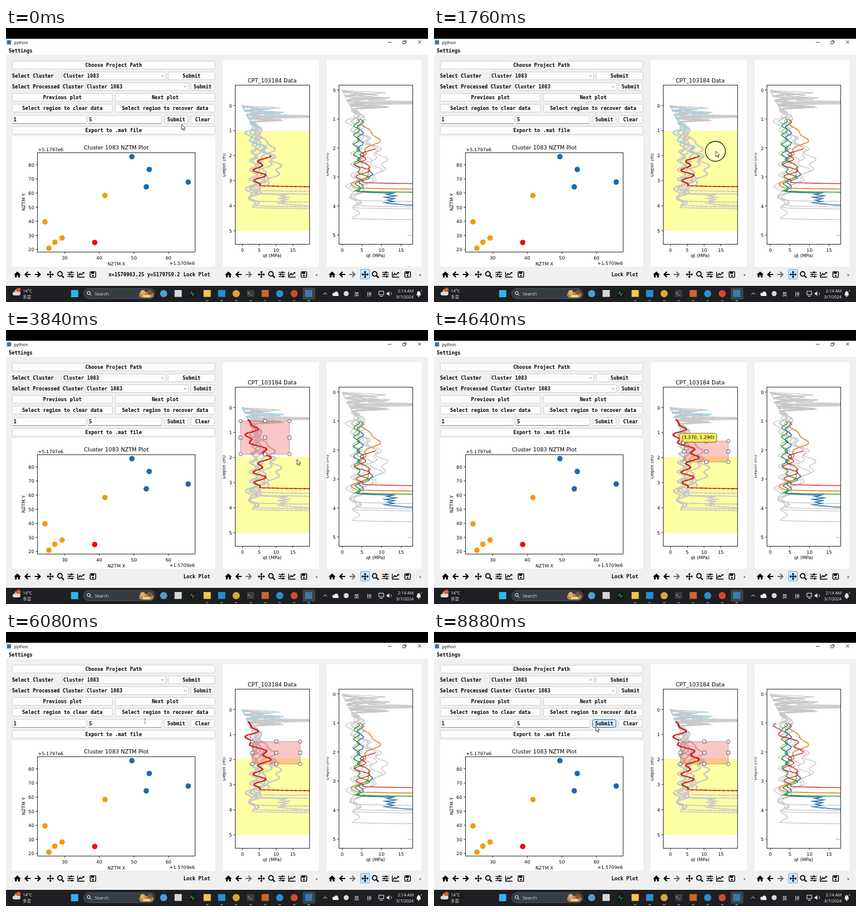
An HTML page with a canvas for the animation above (8960 ms loop, 704 px wide and 458 px high).

```html
<!DOCTYPE html>
<html lang="en">
<head>
<meta charset="utf-8">
<title>Cluster plot tool</title>
<style>
html, body { margin: 0; width: 704px; height: 458px; overflow: hidden; background: #000; }
canvas { display: block; }
</style>
</head>
<body>
<canvas id="stage" width="704" height="458"></canvas>
<script>
const LOOP = 8960, STEP = 80;
const main = document.getElementById('stage').getContext('2d');
let c = main;

const MONO = 'bold 8.25px "DejaVu Sans Mono", monospace';
const TICK = '7.6px "DejaVu Sans", sans-serif';
const HEAD = '9.15px "DejaVu Sans", sans-serif';
const UI = '7px "Open Sans", sans-serif';
const CJK = '8px "Noto Sans CJK TC", "Noto Sans CJK", "Noto Sans CJK SC", sans-serif';

// ---------- drawing helpers ----------
function text(s, x, y, font, color = '#000', align = 'left') {
  c.font = font; c.fillStyle = color; c.textAlign = align;
  c.fillText(s, x, y);
}
function rect(x, y, w, h, color) { c.fillStyle = color; c.fillRect(x, y, w, h); }
function paint(fill, stroke, lw) {
  if (fill) { c.fillStyle = fill; c.fill(); }
  if (stroke) { c.strokeStyle = stroke; c.lineWidth = lw; c.stroke(); }
}
function box(x, y, w, h, r, fill, stroke, lw = 1) {
  c.beginPath(); c.roundRect(x, y, w, h, r); paint(fill, stroke, lw);
}
function disc(x, y, r, fill, stroke, lw = 1) {
  c.beginPath(); c.arc(x, y, r, 0, 7); paint(fill, stroke, lw);
}
function trace(p) {
  c.beginPath();
  for (let i = 0; i < p.length; i += 2) c.lineTo(p[i], p[i + 1]);
}
function line(p, color, lw = 1) { trace(p); paint(null, color, lw); }
function poly(p, fill, stroke, lw) { trace(p); c.closePath(); paint(fill, stroke, lw); }
function upright(s, x, y, font) {
  c.save(); c.translate(x, y); c.rotate(-Math.PI / 2);
  text(s, 0, 0, font, '#000', 'center');
  c.restore();
}
function clipTo(x, y, w, h, draw) {
  c.save(); c.beginPath(); c.rect(x, y, w, h); c.clip(); draw(); c.restore();
}
function rng(seed) {
  return (a, b) => {
    seed = (seed * 16807) % 2147483647;
    return a + (b - a) * seed / 2147483647;
  };
}
const smooth = u => { u = Math.min(1, Math.max(0, u)); return u * u * (3 - 2 * u); };

// ---------- soundings, in the units of the right-hand plot ----------
// Each runs down from the surface with spikes near the top, then wiggles about
// a base with a few lumps [depth, size, spread] and leaves to the right.
function sounding(seed, { base, lumps, wig, period = 18, peak = 201, exit, teeth = 0, spikes }) {
  const r = rng(seed * 104729), out = [];
  r(0, 1);
  spikes = spikes || Array.from({ length: 4 }, (_, i) =>
    [110 + i * 7.5 + r(-2, 2), i === 2 && seed % 2 ? 150 : r(15, 75), r(2, 4.5)]);
  for (let y = 104; y < exit; y += 0.9) {
    let top = 561 + (y - 104) * 0.5;
    for (const [at, h, w] of spikes) top += h * Math.max(0, 1 - Math.abs(y - at) / w);
    let body = base + wig * Math.cos(2 * Math.PI * (y - peak) / period);
    for (const [at, h, w] of lumps) body += h * Math.exp(-(((y - at) / w) ** 2));
    const mix = smooth((y - 128) / 22);
    out.push([top + (body - top) * mix + r(-0.8, 0.8) * smooth((y - 104) / 10), y]);
  }
  const run = (x1, y1) => {
    const [x0, y0] = out[out.length - 1], n = Math.ceil(Math.abs(x1 - x0) / 9);
    for (let i = 1; i <= n; i++) out.push([x0 + (x1 - x0) * i / n, y0 + (y1 - y0) * Math.sqrt(i / n)]);
  };
  for (let i = 0; i < teeth; i++) run(i % 2 ? r(631, 637) : r(646, 656), exit + 2 + i * 2.3);
  run(700, out[out.length - 1][1] + 2.5);
  return out;
}
const red = sounding(1, { base: 588, wig: 8, period: 18.5, exit: 258, spikes: [[117, 80, 4]],
  lumps: [[162, -19, 12], [196, 22, 18], [240, 11, 8]] });
const orange = sounding(2, { base: 595, wig: 4, period: 20, peak: 190, exit: 267,
  lumps: [[186, 27, 14], [239, 14, 10], [262, -16, 9]] });
const green = sounding(3, { base: 585, wig: 5, period: 16, peak: 187, exit: 273, lumps: [[249, 17, 8]] });
const blue = sounding(4, { base: 591, wig: 5, peak: 193, exit: 274, lumps: [[240, 20, 11]], teeth: 9 });
const right = [[225, 42, 30], [286, -14, 12]];
const greys = [
  sounding(5, { base: 591, wig: 6, exit: 301, lumps: right }),
  sounding(7, { base: 590, wig: 6, exit: 297, lumps: [[206, 32, 20], [268, -18, 18]] }),
  sounding(8, { base: 582, wig: 7, exit: 288, lumps: [[180, 8, 12]] })
];
const deep = sounding(6, { base: 584, wig: 6, exit: 319, lumps: [[240, 38, 25]] });

const toMid = ([x, y]) => [394.5 + (x - 561) * 0.855, 129.5 + (y - 103.5) * 0.866];
const part = (pts, from, to) => pts.filter(q => q[1] >= from && q[1] <= to);
function curve(pts, color, from = 0, to = 999) { line(part(pts, from, to).flat(), color, 1.35); }
function beaded(pts, color, from = 0, to = 999) {
  const p = part(pts, from, to).map(toMid);
  line(p.flat(), color, 1.4);
  for (const [x, y] of p) disc(x, y, 1.2, color);
}

// ---------- plots ----------
const ticks = (n, v0, dv, p0, dp) => Array.from({ length: n }, (_, i) => [v0 + i * dv, p0 + i * dp]);
function axes(x, y, w, h, xt, yt) {
  c.strokeStyle = '#000'; c.lineWidth = 0.8;
  c.strokeRect(x + 0.5, y + 0.5, w, h);
  for (const [v, px] of xt) {
    line([px, y + h + 0.5, px, y + h + 3.5], '#000', 0.8);
    text(v, px, y + h + 12.5, TICK, '#000', 'center');
  }
  for (const [v, py] of yt) {
    line([x - 2.5, py, x + 0.5, py], '#000', 0.8);
    text(v, x - 5, py + 3, TICK, '#000', 'right');
  }
}
function scatter() {
  rect(10, 181, 339, 218, '#fff');
  const dots = (color, ...p) => { for (const [x, y] of p) disc(x, y, 4.5, color); };
  dots('#1b6aae', [210, 215], [239, 236.5], [234, 265.5], [304, 257.5]);
  dots('#f6990f', [165, 280], [65, 324], [93.5, 351], [81.5, 358], [71.5, 368]);
  dots('#ee0a0a', [148, 358.5]);
  axes(52, 208, 263, 166, ticks(4, 30, 10, 98, 57.7), ticks(7, 20, 10, 370.3, -23.6));
  text('Cluster 1083 NZTM Plot', 184, 202.5, HEAD, '#000', 'center');
  text('+5.1797e6', 53.5, 206, TICK);
  text('+1.5709e6', 315, 396, TICK, '#000', 'right');
  text('NZTM X', 184, 397, TICK, '#000', 'center');
  upright('NZTM Y', 31.5, 291, TICK);
}
function depthPlot(x, w, labelX, labelY) {
  text('qt (MPa)', x + w / 2, 383, TICK, '#000', 'center');
  upright('Depth (m)', labelX, labelY, TICK);
}
function midPlot(recovered) {
  clipTo(362, 54, 160, 345, () => {
    rect(362, 54, 160, 345, '#fff');
    depthPlot(382, 124, 366, 229);
  });
  const y0 = recovered ? 212 : 172, split = recovered ? 127 : 201;
  rect(382.5, y0, 124, 339 - y0, '#fefea3');
  clipTo(382, 96, 124.5, 265, () => {
    for (const g of [...greys, orange, green, blue]) beaded(g, '#c8c8c8');
    beaded(red, '#9fd3ea', 0, split);
    beaded(red, '#cf1d1f', split);
  });
  axes(382, 95, 124, 266, ticks(4, 0, 5, 394.5, 28), ticks(6, 0, 1, 129.5, 41.9));
  text('CPT_103184 Data', 444, 91, HEAD, '#000', 'center');
}
function rightPlot(submitted) {
  clipTo(535, 54, 158, 345, () => {
    rect(535, 54, 158, 345, '#fff');
    depthPlot(555, 123, 538, 228);
  });
  clipTo(555, 96, 123.5, 265, () => {
    for (const g of [...greys, deep, orange, green, blue]) curve(g, '#c8c8c8');
    const start = submitted ? 152 : 201;
    curve(red, '#c8c8c8', 0, start);
    line([670, 346.5, 680, 347], '#c8c8c8', 1.3);
    curve(blue, '#1f6fb0', 152);
    curve(orange, '#e5821f', 152);
    curve(green, '#2c9a2c', 152);
    curve(red, '#d02425', start);
  });
  axes(555, 95, 123, 266, ticks(4, 0, 5, 561, 32.7), ticks(6, 0, 1, 103.5, 48.5));
}

// ---------- form ----------
const buttons = [
  ['Choose Project Path', 10, 55, 339], ['Submit', 270, 73, 79], ['Submit', 308, 91, 40],
  ['Previous plot', 10, 109, 168], ['Next plot', 182, 109, 167],
  ['Select region to clear data', 10, 127, 168], ['Select region to recover data', 182, 127, 167],
  ['Submit', 264, 146, 40], ['Clear', 308, 146, 40], ['Export to .mat file', 10, 164, 339]
];
function button([label, x, y, w], hot) {
  box(x + 0.5, y + 0.5, w - 1, 13, 2, hot ? '#dcecf8' : '#fdfdfd', hot ? '#1a7ac4' : '#d2d2d2');
  text(label, x + w / 2, y + 10, MONO, '#000', 'center');
}
function combo(label, x, y, w) {
  text(label, 10, y + 10, MONO);
  box(x + 0.5, y + 0.5, w - 1, 13, 2, '#fdfdfd', '#d2d2d2');
  text('Cluster 1083', x + 2.5, y + 10, MONO);
  line([x + w - 8, y + 6, x + w - 6, y + 8, x + w - 4, y + 6], '#666', 0.8);
}
function field(x, s) {
  box(x + 0.5, 146.5, 123, 13, 2, '#fff', '#dcdcdc');
  line([x + 1, 159.5, x + 123, 159.5], '#909090');
  text(s, x + 2.5, 156, MONO);
}

// ---------- toolbar icons ----------
function backArrow(k) { line([0.5, -4.5, -4, 0, 0.5, 4.5], k, 2); line([-4, 0, 5, 0], k, 2); }
const icons = [
  k => { poly([-6, 0.5, 0, -5, 6, 0.5], k); rect(-4, 0, 2.8, 5, k); rect(1.2, 0, 2.8, 5, k); rect(-2, 0, 4, 1.5, k); },
  backArrow,
  k => { c.scale(-1, 1); backArrow(k); },
  k => {
    for (let i = 0; i < 4; i++) {
      line([0, 0, 4, 0], k, 1.4); poly([6, 0, 3.4, -2.4, 3.4, 2.4], k); c.rotate(Math.PI / 2);
    }
  },
  k => { disc(-1, -1, 3.8, null, k, 1.7); line([1.8, 1.8, 5.5, 5.5], k, 2.2); },
  k => {
    for (const [y, x] of [[-3.5, 1], [0, -2], [3.5, 2]]) {
      line([-5.5, y, 5.5, y], k, 1.2); rect(x - 1, y - 1.6, 2.2, 3.2, k);
    }
  },
  k => { line([-5.5, -4.5, -5.5, 4.5, 6, 4.5], k, 1.3); line([-4, 2, -1.5, -1.5, 0.5, 0.5, 5, -3.5], k, 1.6); poly([2.5, -4, 5.6, -4, 5.6, -1], k); },
  k => { box(-4.6, -4.6, 9.2, 9.2, 1, null, k, 1.4); rect(-3, -4.5, 5, 3.4, k); disc(0, 2, 1.4, k); }
];
function toolbar(x, full) {
  icons.forEach((icon, i) => {
    const gap = (i > 2 ? 4 : 0) + (i > 6 ? 3 : 0);
    c.save(); c.translate(x + i * 17 + gap, 412);
    icon(i === 2 && !full ? '#707070' : '#000');
    c.restore();
  });
  if (!full) text('»', x + 147, 414.5, UI, '#000', 'center');
}

// ---------- window and taskbar ----------
function frameParts() {
  rect(0, 0, 704, 458, '#000');
  rect(0, 18, 704, 27, '#fff');
  rect(0, 45, 704, 386, '#f0f0f0');
  box(1.5, 20.5, 7, 7, 0, '#3f6f9f');
  text('python', 13.5, 27, UI);
  line([637, 24, 643, 24], '#222', 0.9);
  box(662, 22.5, 4, 4, 0, null, '#222', 0.8);
  line([663.5, 21, 667.5, 21, 667.5, 25], '#222', 0.8);
  for (const s of [1, -1]) line([690 - 2.5 * s, 21, 690 + 2.5 * s, 26], '#222', 0.9);
  text('Settings', 4.5, 41, MONO);
  combo('Select Cluster', 93, 73, 174);
  combo('Select Processed Cluster', 132, 91, 173);
  field(10, '1');
  field(136, '5');
  scatter();
  box(591.5, 403.5, 15, 16, 1, '#cce6fb', '#63b0ea');
  toolbar(19, true);
  toolbar(371);
  toolbar(544);
  text('Lock Plot', 296, 415, MONO);
  taskbar();
}
function apps() {
  const round = ['#4f9fd0', '#d8d8d8', '#0d1513', '#f4c64b', '#238fd6', '#d8aa33', '#3a3d40', '#d2622b', '#2591cf', '#d14a2b', '#3f78a8'];
  box(495, 434, 21, 20, 2, '#3b4348');
  round.forEach((color, i) => {
    const x = 263 + i * 24.2;
    if ([0, 2, 5, 8, 9].includes(i)) disc(x, 444, 6, color);
    else rect(x - 6, 438, 12, 11.5, color);
    if (i > 2) rect(x - 2, 455, 4, 1.4, i === 10 ? '#5cb8ee' : '#8b9195');
  });
  line([306, 444, 309, 444, 310, 440, 312, 448, 313, 444, 316, 444], '#39a95a', 0.9);
  text('>_', 403, 446, UI, '#eee');
}
function taskbar() {
  const w = '#f0f0f0';
  rect(0, 431, 704, 27, '#1e1f22');
  disc(19, 441, 5, '#f0a53a'); box(11, 441, 13, 6, 3, '#d8dde2'); disc(21, 437.5, 3.6, '#d6423b');
  text('1', 21, 440, '5px "Open Sans", sans-serif', '#fff', 'center');
  text('14°C', 28, 442, UI, w);
  text('多雲', 28, 452, CJK.replace('8px', '7px'), '#c4c8cb');
  rect(108.5, 438, 12, 12, '#35b2ee');
  box(129.5, 435.5, 119, 17, 8.5, '#363d42', '#4a5156');
  disc(138, 443, 2.6, null, w); line([140, 445, 142.5, 447.5], w);
  text('Search', 148, 446.5, '7.4px "Open Sans", sans-serif', '#e4e4e4');
  box(222, 441, 24, 10, 5, '#b88a42');
  disc(228, 442, 4, '#d6b36a'); disc(240, 442, 4, '#7d5636'); box(228, 446, 13, 4, 2, '#e5cf9a');
  apps();
  line([529.5, 445.5, 532.5, 442.5, 535.5, 445.5], w);
  disc(547, 445, 2.6, w); disc(551, 443.5, 3, w); box(545, 444, 10, 4, 2, w);
  disc(567.5, 444, 4.2, '#d9dcdf');
  text('英', 585, 447.5, CJK, w, 'center');
  text('拼', 606, 447.5, CJK, w, 'center');
  box(622, 440, 8, 6, 0, null, w); line([624, 448.5, 628.5, 448.5], w);
  poly([635, 442.5, 637, 442.5, 639.5, 440, 639.5, 448, 637, 445.5, 635, 445.5], w);
  c.beginPath(); c.arc(640, 444, 3, -0.8, 0.8); paint(null, w, 0.8);
  text('2:14 AM', 680, 442, UI, w, 'right');
  text('3/7/2024', 680, 452, UI, w, 'right');
  poly([685, 447, 686, 441.5, 688.5, 439.5, 691, 441.5, 692, 447], w);
  disc(688.5, 448.3, 1.2, w);
  text('z', 692, 441, '5px "Open Sans", sans-serif', w);
}

// ---------- pointer and selection ----------
const dragA = { x: 473, y: 207.5, from: 1840, to: 3280, off: 4080 };
const dragB = { x: 491, y: 220.5, from: 4160, to: 5040, off: LOOP };
// moves: start time, end time, goal; the pointer rests in between
const moves = [
  [480, 1440, 470, 206], [1800, 2880, 391.224, 152.111], [3360, 3920, 491, 220],
  [4080, 4640, 413.372, 183.62], [4660, 4800, 411, 183], [5040, 5760, 232, 149],
  [6320, 7280, 275, 151], [7920, 8640, 270, 157]
];
function pointer(t) {
  let x = 293, y = 161;
  for (const [a, b, gx, gy] of moves) {
    const e = smooth((t - a) / (b - a));
    x += (gx - x) * e; y += (gy - y) * e;
  }
  return [x, y];
}
function selection(x0, y0, x1, y1) {
  const w = x1 - x0, h = y1 - y0;
  box(x0, y0, w, h, 0, 'rgba(238,30,30,0.25)', 'rgba(70,20,40,0.35)', 0.9);
  for (let i = 0; i < 3; i++) for (let j = 0; j < 3; j++) {
    const x = x0 + w * i / 2, y = y0 + h * j / 2;
    if (i !== 1 && j !== 1) disc(x, y, 2.8, '#fff', '#555', 0.9);
    else box(x - 2.7, y - 2.7, 5.4, 5.4, 0, '#fff', '#555', 0.9);
  }
}
function tip([x, y]) {
  const qt = (x - 394.5) / 5.6, depth = (y - 129.5) / 41.95;
  const s = `(${qt.toFixed(3)}, ${depth.toFixed(3)})`;
  c.font = TICK;
  box(x - 4, y - 11, c.measureText(s).width + 8, 15, 3.5, 'rgba(250,238,72,0.85)', '#6b641c', 0.9);
  text(s, x, y - 1.2, TICK);
}
function arrow(x, y) {
  c.save(); c.translate(x, y);
  poly([0, 0, 0, 9, 2, 7.2, 3.6, 10.6, 5, 10, 3.5, 6.7, 6.2, 6.5], '#fff', '#222', 0.8);
  c.restore();
}
function beam(x, y) {
  for (const s of [-4, 4]) line([x - 1.5, y + s, x + 1.5, y + s], '#777', 0.8);
  line([x, y - 4, x, y + 4], '#777', 0.8);
}

function layer(draw) {
  const el = document.createElement('canvas');
  el.width = 704; el.height = 458;
  c = el.getContext('2d'); draw(); c = main;
  return el;
}
const base = layer(frameParts);
const mids = [false, true].map(v => layer(() => midPlot(v)));
const rights = [false, true].map(v => layer(() => rightPlot(v)));

function draw(t) {
  const pos = pointer(t), [px, py] = pos;
  const over = (x, y, w) => px > x && px < x + w && py > y && py < y + 14;
  c.drawImage(base, 0, 0);
  c.drawImage(mids[+(t >= dragA.to)], 0, 0);
  c.drawImage(rights[+(t >= 7840)], 0, 0);
  for (const b of buttons) button(b, over(b[1], b[2], b[3]));
  if (t < 640) text('x=1570963.25 y=5179759.2', 171, 415, MONO);

  for (const d of [dragA, dragB]) {
    // the box trails the pointer by one step
    if (t >= d.from && t < d.off) selection(...pointer(Math.min(t, d.to) - STEP), d.x, d.y);
    if (t >= d.from && t < d.to) tip(pos);
  }
  if (t >= 1680 && t < dragA.from) disc(469.5, 206, 16.7, 'rgba(255,255,255,0.35)', '#111', 1.2);

  if (over(10, 146, 124) || over(136, 146, 124)) beam(px, py);
  else arrow(px, py);
}
const begin = performance.now();
function run() {
  const t = (performance.now() - begin) % LOOP;
  draw(Math.floor(t / STEP) * STEP);
  requestAnimationFrame(run);
}
run();
</script>
</body>
</html>
```
